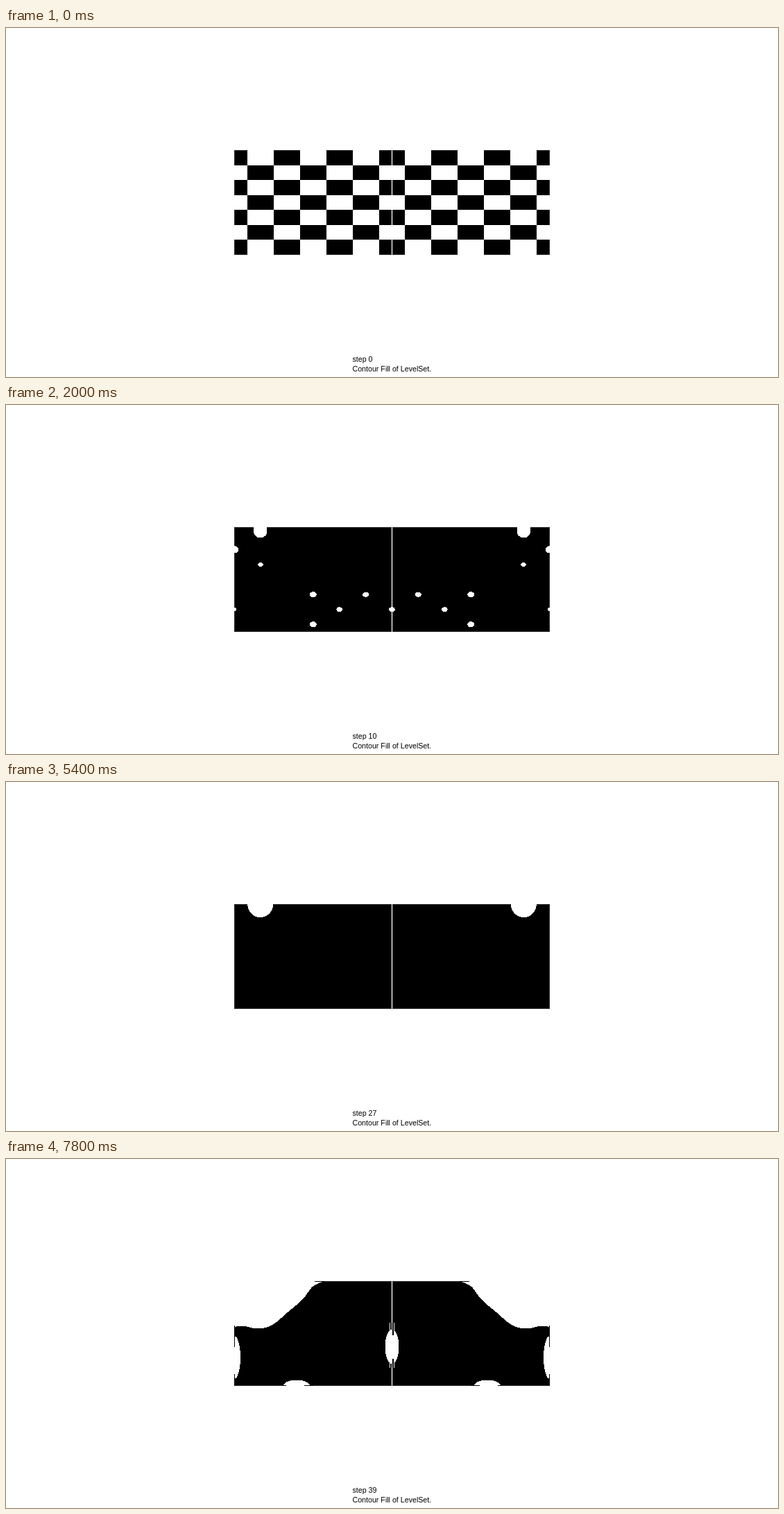
Animation of 1113x503 px, one loop 8 s. Source, as an HTML page:

```html
<!DOCTYPE html>
<html lang="en">
<head>
<meta charset="utf-8">
<title>Contour Fill of LevelSet</title>
<style>
html, body { margin: 0; width: 100%; height: 100%; overflow: hidden; background: #fff; }
svg { display: block; width: 1113px; height: 503px; }
text { font: 10.67px "Liberation Sans", Arial, sans-serif; }
</style>
</head>
<body>
<svg viewBox="0 0 1113 503">
  <g id="half" shape-rendering="crispEdges">
    <rect x="329.5" y="176.5" width="226" height="150" stroke="#262626"/>
    <path id="holes" fill="#fff"/>
    <path id="marks"/>
  </g>
  <use href="#half" transform="translate(1113) scale(-1 1)"/>
  <text id="label" x="499.5" y="481"></text>
  <text x="499.5" y="495">Contour Fill of LevelSet.</text>
</svg>
<script>
const STEP = 200, COUNT = 40;
const LEFT = 329, TOP = 176, BOTTOM = 327, MID = 556.5;
const DX = (MID - LEFT) / 6, DY = (BOTTOM - TOP) / 7;
const holes = document.getElementById('holes');
const marks = document.getElementById('marks');
const label = document.getElementById('label');

// Places where holes close sooner, in grid units
const spots = [
  { x: 5, y: -0.1, fx: 0.125, fy: 0.19, loss: 110 },
  { x: 1.2, y: 4.8, fx: 1.43, fy: 0.36, loss: 175 },
  { x: 3.5, y: 3, fx: 0.15, fy: 4, loss: 500 },
  { x: 5, y: 7, fx: 0.4, fy: 0.3, loss: 85 }
];

// Lower edge of the wide notch at the last step, right to left
const lastEdge = [[459, 176], [442, 184], [428, 202], [406, 221],
  [384, 239], [363, 244.5], [340, 240.5], [323, 244]];

const mix = (a, b, t) => a + (b - a) * t;
const poly = pts => 'M' + pts.map(p => p.map(v => v.toFixed(2)).join(' ')).join('L') + 'Z';
const bar = (x, y, w, h) => `M${x} ${y}h${w}v${h}h${-w}z`;

// Superellipse: power 0 is a rectangle, 1 an ellipse
function blob(cx, cy, rx, ry, power = 1) {
  const bend = v => Math.sign(v) * Math.abs(v) ** power;
  return poly(Array.from({ length: 40 }, (_, i) => {
    const a = (i + 0.5) * Math.PI / 20;
    return [cx + rx * bend(Math.cos(a)), cy + ry * bend(Math.sin(a))];
  }));
}

// Catmull-Rom samples through open points
function smooth(pts) {
  const out = [];
  for (let i = 0; i < pts.length - 1; i++) {
    const a = pts[Math.max(0, i - 1)], b = pts[i], c = pts[i + 1], d = pts[Math.min(pts.length - 1, i + 2)];
    for (let t = 0; t < 1; t += 0.125) {
      out.push([0, 1].map(j => b[j] + t / 2 * (c[j] - a[j] +
        t * (2 * a[j] - 5 * b[j] + 4 * c[j] - d[j] + t * (3 * (b[j] - c[j]) + d[j] - a[j])))));
    }
  }
  return [...out, pts[pts.length - 1]];
}

// Squared radius falls quickly over three steps, then steadily
function hole(n, col, row) {
  const loss = spots.reduce((sum, s) =>
    sum + s.loss * Math.exp(-s.fx * (col - s.x) ** 2 - s.fy * (row - s.y) ** 2), 0);
  const early = Math.max(0, 169 - loss * loss / 220);
  const late = Math.min(early, 100 - loss);
  const area = n < 3 ? mix(DX * DX / 4, early, n / 3) : mix(early, late, (n - 3) / 4);
  if (area < 1) return '';
  const rx = Math.sqrt(area), aspect = Math.min(0.8, DY / DX + 0.025 * n);
  return blob(LEFT + col * DX, TOP + (row + 0.5) * DY, rx, rx * aspect, Math.min(1, n / 3));
}

function grid(n) {
  let path = '';
  for (let row = 0; row < 7; row++) {
    for (let col = 1 - row % 2; col <= 6; col += 2) {
      if (row || col > 1) path += hole(n, col, row);
    }
  }
  return path;
}

// The hole that opens to the top edge shrinks, then swells
function notch(n) {
  const swell = 20.5 * (n / 31) ** 6;
  const rx = 9.5 + 9.5 * Math.exp(-n / 3) + swell;
  const ry = 9.3 + 1.5 * Math.exp(-n) + 0.03 * n + swell;
  const cx = LEFT + DX - 0.3, cy = TOP + Math.max(0, 10.8 - n / 2);
  const neck = rx * Math.min(1, 0.25 + 0.08 * n);
  return blob(cx, cy, rx, ry, Math.min(1, n / 3)) +
    poly([[cx - neck, TOP], [cx + neck, TOP], [cx + rx, cy], [cx - rx, cy]]);
}

function wideNotch(n) {
  const t = ((n - 31) / 8) ** 1.3;
  const pts = lastEdge.map(([x, y], i) => {
    const a = i * Math.PI / (lastEdge.length - 1);
    return [mix(366.5 + 30 * Math.cos(a), x, t), mix(TOP + 30 * Math.sin(a), y, t)];
  });
  const right = pts[0][0], left = pts[pts.length - 1][0];
  return { right, path: poly([...smooth(pts), [left, 170], [right, 170]]) };
}

function draw(n) {
  let white = grid(n), black = '';
  if (n <= 31) {
    white += notch(n);
  } else {
    const wide = wideNotch(n), g = Math.max(0, (n - 35) / 4);
    white += wide.path;
    if (g) {
      white += blob(LEFT, 286, 9 * g, 31 * g) + blob(MID, 270.5, 10 * g, 25 * g) +
        blob(419, BOTTOM, 19 * g, 8.5 * g);
    }
    // Thin contour lines left along the borders
    if (n > 37) {
      white += bar(553, 236, 1, 12) + bar(553, 292, 1, 9);
      black = bar(wide.right - 14, TOP, 14, 1) + bar(LEFT, 240, 1, 31) + bar(LEFT, 310, 1, 17) +
        bar(398, 326, 6, 1) + bar(430, 326, 13, 1) + bar(554, 236, 2, 18) + bar(554, 288, 2, 12);
    }
  }
  holes.setAttribute('d', white);
  marks.setAttribute('d', black);
  label.textContent = 'step ' + n;
}

let shown = -1;
function tick() {
  const n = Math.floor(performance.now() / STEP) % COUNT;
  if (n !== shown) draw(shown = n);
  requestAnimationFrame(tick);
}
tick();
</script>
</body>
</html>
```
